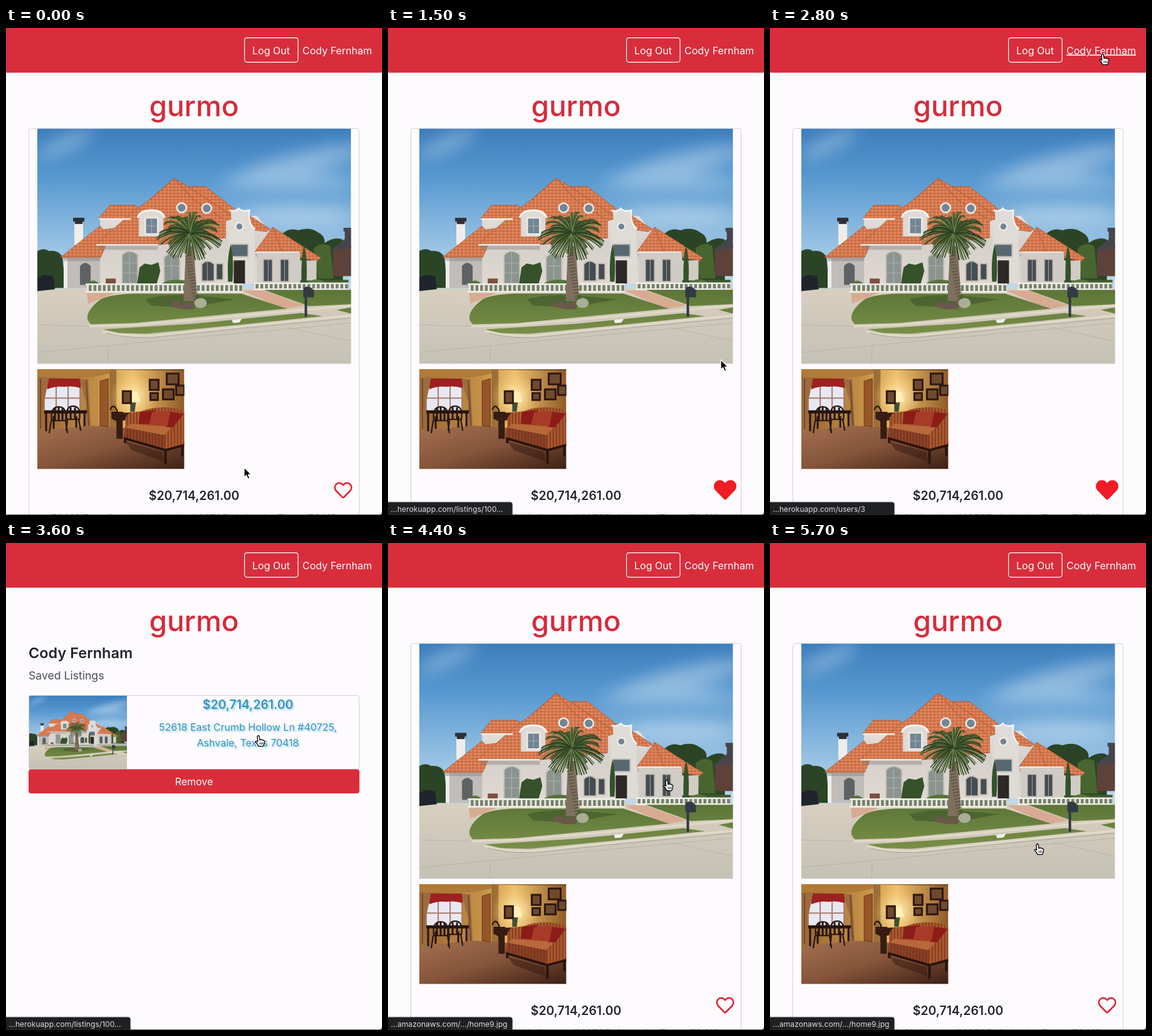
An HTML page that plays this animation: 600 by 778 pixels, repeating every 5800 ms.

```html
<!DOCTYPE html>
<html lang="en">
<head>
<meta charset="utf-8">
<title>Saved listings</title>
<style>
  html, body { margin: 0; height: 100%; overflow: hidden; background: #fdfbfe; }
  svg { display: block; }
  #stage { width: 100vw; height: 100vh; }
  text { font: 16px Inter, sans-serif; }
  .mid { text-anchor: middle; }
  .brand { font-size: 46px; font-weight: 500; fill: #d62b3a; }
  .price { font-size: 19.4px; font-weight: 600; fill: #212529; }
  .link { fill: #212529; }
  .hover .link { fill: #3593bd; filter: drop-shadow(2px 2px 1px #9fd3ea); }
  #status { filter: drop-shadow(0 0 1.5px #0005); }
  #status text { font-size: 12.1px; fill: #dcdcde; }
</style>
</head>
<body>
<svg id="stage" viewBox="0 0 600 778">
  <defs>
    <linearGradient id="sky" x2="0" y2="1">
      <stop stop-color="#3d7ebd"/><stop offset=".3" stop-color="#5798d0"/><stop offset=".6" stop-color="#86b7de"/><stop offset="1" stop-color="#c3dcef"/>
    </linearGradient>
    <linearGradient id="road" x2="0" y2="1">
      <stop stop-color="#d8cfbf"/><stop offset="1" stop-color="#c4c1b5"/>
    </linearGradient>
    <linearGradient id="lawn" x2="0" y2="1">
      <stop stop-color="#5c7637"/><stop offset="1" stop-color="#798f48"/>
    </linearGradient>
    <linearGradient id="stucco" x2="0" y2="1">
      <stop stop-color="#e4dfda"/><stop offset=".4" stop-color="#d5d0cc"/><stop offset="1" stop-color="#dfd9d1"/>
    </linearGradient>
    <linearGradient id="wall">
      <stop stop-color="#98642f"/><stop offset=".45" stop-color="#c89449"/><stop offset=".65" stop-color="#efc16d"/><stop offset="1" stop-color="#8f5a28"/>
    </linearGradient>
    <linearGradient id="floor" y2="1">
      <stop stop-color="#a4704f"/><stop offset=".5" stop-color="#85543a"/><stop offset="1" stop-color="#3c2015"/>
    </linearGradient>
    <radialGradient id="glow">
      <stop stop-color="#fff3c0"/><stop offset="1" stop-color="#f8cf7c" stop-opacity="0"/>
    </radialGradient>
    <pattern id="tiles" width="6" height="5" patternUnits="userSpaceOnUse">
      <path fill="#d97a50" d="M0 0H6V5H0Z"/>
      <path d="M0 4.3H6" stroke="#bb6038" stroke-width="1.2"/>
      <path d="M1 0V4" stroke="#e79b75" stroke-width="1.2"/>
    </pattern>
    <pattern id="weave" width="5" height="4" patternUnits="userSpaceOnUse">
      <path fill="#924322" d="M0 0H5V4H0Z"/><path d="M1 0V4" stroke="#bd733d" stroke-width="1.2"/>
    </pattern>
    <filter id="soft" x="-50%" y="-150%" width="200%" height="400%"><feGaussianBlur stdDeviation="13"/></filter>
    <path id="heart" d="M14.5-13.6C10.6-16.8 4.9-16.3 1.4-12.6L0-11.2-1.4-12.6C-4.9-16.3-10.6-16.8-14.5-13.6-18.9-9.8-19.1-3.1-15.2 1L-1.6 14.9C-.8 15.8.7 15.8 1.6 14.9L15.2 1C19.1-3.1 18.9-9.8 14.5-13.6Z"/>

    <symbol id="house" viewBox="50 161 500 375">
      <path fill="url(#sky)" d="M50 161H550V420H50Z"/>
      <g fill="#e4f0f9" opacity=".42" filter="url(#soft)">
        <ellipse cx="465" cy="218" rx="105" ry="18" transform="rotate(-14 465 218)"/>
        <ellipse cx="450" cy="245" rx="110" ry="12"/>
        <ellipse cx="95" cy="185" rx="50" ry="10" transform="rotate(-25 95 185)"/>
        <ellipse cx="465" cy="300" rx="90" ry="16"/>
      </g>
      <g fill="#2b4425">
        <path d="M50 356Q60 350 69 356 84 354 90 366L95 415H50Z"/>
        <path d="M441 328Q452 318 466 323 484 317 497 326 509 332 508 343 525 332 537 338V410H441Z"/>
      </g>
      <path fill="#48652f" d="M490 352Q503 340 517 348L522 400H497Z"/>
      <path fill="#5d4239" d="M521 355L550 348V396H521Z"/>
      <path fill="#46454b" d="M517 356L540 337V325H538V319H550V351Z"/>
      <path fill="url(#road)" d="M50 416H550V536H50Z"/>
      <path fill="#20242d" d="M50 399L60 394 75 396 78 417 50 420Z"/>
      <path fill="#3f5a2c" d="M480 402H546V418H480Z"/>

      <path fill="url(#stucco)" d="M92 362H150V304H200L262 300H400L421 325V408H92Z"/>
      <path fill="#bfbcba" d="M92 364H150V415H92Z"/>
      <path fill="#5f6263" d="M118 380Q126 370 135 380V410H118Z"/>
      <path fill="#efedea" d="M92 368H98V415H92ZM109 312H123V346H109Z"/>
      <path fill="#302f32" d="M107 303H125V309H122V313H110V309H107Z"/>
      <g fill="url(#tiles)" stroke="#ad5a38" stroke-width=".8">
        <path d="M148 304L165 283H206L216 290 196 304Z"/>
        <path d="M87 366L150 316 155 322 188 318 160 345 151 366Z"/>
        <path d="M144 345L205 291 228 275 268 240 290 253H318L363 288V304L350 308V335L242 346Z"/>
        <path d="M384 297L421 321 415 325 390 322Z"/>
        <path d="M397 357L425 318 502 367 496 372 470 367 468 357Z"/>
      </g>
      <path d="M228 275L268 240 300 275 345 304M290 253L363 302M425 318L440 357" fill="none" stroke="#b85f3a" stroke-width="1.2"/>
      <path fill="#7f7a76" opacity=".4" d="M148 347H242V354H148ZM398 359H469V365H398ZM92 366H150V372H92Z"/>
      <path d="M144 346H242M148 305H199M398 358H468" stroke="#f0ece7" stroke-width="2.5"/>
      <path fill="#dedad5" d="M212 333V302Q213 291 232 291 250 291 251 302V333Z"/>
      <path d="M210 303Q213 291 232 291 249 291 253 303" fill="none" stroke="#f7f5f1" stroke-width="3"/>
      <path fill="#dfdbd6" d="M355 408V320Q361 318 358 291 367 294 371 288 376 294 387 291 384 312 396 320V408Z"/>
      <path d="M356 291Q367 294 371 288 376 294 388 291 385 312 397 321" fill="none" stroke="#f7f5f0" stroke-width="2.5"/>
      <path fill="#d0ccc5" d="M400 359H469V408H400ZM469 371H495V403H469Z"/>
      <g fill="#718594" stroke="#eeebe6" stroke-width="2.5">
        <circle cx="280" cy="287" r="7.5"/><circle cx="320" cy="288" r="7.5"/><circle cx="372" cy="317" r="6"/>
        <path d="M222 329V303H242V329Z"/>
      </g>
      <g fill="#8b948f" stroke="#c6c1b7" stroke-width="2">
        <path d="M185 408V362Q197 351 210 362V408ZM252 408V366Q264 354 277 366V408Z"/>
        <path fill="#464d51" d="M312 404V377Q321 367 332 377V404ZM335 402V376H346V402ZM410 405V369H425V405ZM437 405V369H451V405Z"/>
        <path fill="#586871" d="M358 365V345H386V365Z"/>
      </g>
      <path d="M197 358V408M185 375H210M185 391H210M264 363V408M252 380H277M232 303V329M222 316H242M418 369V405M444 369V405M321 373V404" stroke="#b9bebb" stroke-width=".8"/>
      <path fill="#2e2926" d="M363 371H381V408H363Z"/>
      <path fill="#7b5040" d="M159 400H175V411H159Z"/>
      <g fill="#35522b">
        <path d="M209 408L213 382 221 376 232 378 243 374 246 388 240 409ZM354 405Q352 367 358 346 364 368 361 405ZM471 406Q470 368 475 347 481 368 479 406Z"/>
        <path fill="#57743a" d="M129 410Q137 397 150 409ZM480 407Q496 395 511 407ZM246 410Q264 394 309 409Z"/>
      </g>
      <path d="M129 415H378M395 412H546" stroke="#76806a" stroke-width="10"/>
      <path d="M129 415H378M395 412H546" stroke="#eae8e3" stroke-width="10" stroke-dasharray="3 4.5"/>
      <path d="M127 409H378M127 421H378M395 407.5H546M395 417H546" stroke="#f1efea" stroke-width="2.5"/>
      <path fill="#d7ab92" d="M129 423H174L131 440ZM377 419H411L476 443 443 449Z"/>
      <path fill="url(#lawn)" d="M130 466Q127 451 151 433 166 425 205 424H375L448 448 310 461 205 471 135 473ZM411 418H550V441L483 444ZM155 481L300 472 470 455 505 460 380 473 225 488 180 487ZM527 450L550 446V456Z"/>
      <path fill="#3f562b" opacity=".6" d="M222 433Q255 424 299 427L365 433 338 438 292 447 231 443Z"/>
      <path d="M133 476L205 474 310 465 483 449 550 443M154 484Q190 493 235 491L380 476 508 463 550 459" fill="none" stroke="#e2d8c7" stroke-width="3.5"/>
      <path d="M160 487Q195 496 235 494L380 479 550 463" fill="none" stroke="#a9a598"/>
      <path d="M50 518L235 500 550 471M163 508L162 536M450 478L550 500M50 474L133 476" fill="none" stroke="#b3b0a5" stroke-width=".8"/>
      <path fill="#f3f2eb" d="M360 466L376 464 372 470 362 471Z"/>
      <path fill="#6c584b" d="M264 439Q272 432 280 440L300 437 300 449H282L264 445Z"/>
      <ellipse cx="310" cy="439" rx="10" ry="8" fill="#aaae96"/>
      <path fill="#7f705e" d="M287 348H299L304 420 300 436H283Z"/>
      <path d="M288 353L303 433" stroke="#463f34" stroke-width="10" stroke-dasharray="2 3" opacity=".5"/>
      <g id="palm" fill="none" stroke-width="1.8" stroke-linecap="round"></g>
      <path d="M478 425V461" stroke="#313840" stroke-width="4"/>
      <path fill="#343a43" d="M474 415Q483 409 491 419V430H474Z"/>
    </symbol>

    <symbol id="room" viewBox="50 545 234 159">
      <path fill="url(#wall)" d="M50 545H284V704H50Z"/>
      <path fill="#b07a38" d="M50 545H165V552L136 558H50Z"/>
      <path fill="#6e451f" opacity=".55" d="M165 545H284V548L176 546V638H165Z"/>
      <path fill="url(#floor)" d="M50 643L136 635 187 638 284 660V704H50Z"/>
      <circle cx="203" cy="588" r="38" fill="url(#glow)"/>
      <path fill="#e8e8f2" d="M61 566H118V613H61Z"/>
      <path d="M61 566H118V613H61ZM80 566V613M99 566V613M61 591H118" fill="none" stroke="#a87d69" stroke-width="2"/>
      <path fill="#9c211f" d="M64 560H119V575Q106 571 93 573 79 571 66 577Z"/>
      <path fill="#9c6c3e" d="M50 558H69L62 591 56 600 63 640 50 644ZM117 561H131L135 637H124L128 600Z"/>
      <path d="M55 560V640M128 563L132 635" stroke="#75492a" stroke-width="2"/>
      <path fill="#965628" stroke="#60371b" d="M150 564L163 560V637L150 635Z"/>
      <g stroke="#251511" fill="none" stroke-width="3">
        <path d="M61 613H129" stroke-width="5"/><path d="M64 612V644M125 612V636M76 620V640M112 620V638"/>
        <path d="M73 627Q70 605 84 605 98 605 95 627ZM72 627L69 647M95 627L98 647M97 625Q94 604 107 604 120 604 117 625ZM98 625L96 643M116 625L119 643M166 610Q171 598 177 611V637M168 614H187M183 615V656" stroke-width="2.2"/>
        <path d="M78 607V627M84 605V627M90 607V627M103 606V625M110 606V625"/>
      </g>
      <path fill="#371c12" d="M168 615L199 614V625L186 627V656H176V628L168 624Z"/>
      <path fill="#fff0b7" d="M196 581H209L214 597H191Z"/>
      <path fill="#405034" d="M198 598H207L205 613H198Z"/>
      <g fill="#704a2d" stroke="#2d1811" stroke-width="3">
        <path d="M186 580H199V599H186ZM229 562H243V578H229ZM256 552H275V569H256ZM230 583H242V594H230ZM250 577H267V593H250ZM271 571H284V586H271Z"/>
      </g>
      <path fill="url(#weave)" d="M190 634Q188 619 198 614L216 612Q240 602 276 608L284 614V666L254 674 188 656Z"/>
      <path fill="#64291b" d="M190 635L253 650V672L188 656Z" opacity=".45"/>
      <path fill="#b8683a" d="M199 632L249 636 274 627 252 650 190 638Z"/>
      <path fill="#8b1c18" d="M214 613L238 610 236 633 211 632ZM262 613L283 616 266 638 254 637Z"/>
      <path fill="#a83a28" d="M233 613L262 612 257 636 228 633Z"/>
      <path d="M188 655L254 674 284 666M190 656V663M254 674V696M281 667V684" fill="none" stroke="#2b140e" stroke-width="4"/>
      <path fill="#32190f" opacity=".5" d="M190 660L249 677 251 692 200 674Z"/>
    </symbol>
  </defs>

  <rect width="600" height="778" fill="#fdfbfe"/>
  <rect width="600" height="71.4" fill="#d92d3c"/>
  <rect x="380.6" y="15.6" width="85.5" height="39" rx="4" fill="none" stroke="#fff" stroke-width="1.2"/>
  <text x="423" y="41.5" class="mid" fill="#fff">Log Out</text>
  <text id="user" x="584" y="41.5" text-anchor="end" fill="#fff">Cody Fernham</text>
  <text x="300" y="141" class="mid brand">gurmo</text>

  <g id="listing">
    <rect x="36.5" y="160.5" width="527" height="640" rx="4" fill="#fdfbfe" stroke="#d3d1d5"/>
    <use href="#house" x="50" y="161" width="500.6" height="375.5"/>
    <use href="#room" x="50" y="545" width="234.5" height="159.5"/>
    <text x="300" y="753.5" class="mid price">$20,714,261.00</text>
    <text x="300" y="789.3" class="mid" style="font-weight:500">52618 East Crumb Hollow Ln #40725, Ashvale, Texas 70418</text>
    <use id="empty" href="#heart" transform="translate(538 738.5) scale(.74)" fill="none" stroke="#df2535" stroke-width="3.5"/>
    <use id="full" href="#heart" transform="translate(538 738)" fill="#f01c25"/>
  </g>

  <g id="profile">
    <text x="36" y="183.5" style="font-size:23.5px;font-weight:600" fill="#212529">Cody Fernham</text>
    <text x="36" y="218" style="font-size:17.6px" fill="#4c4b4f">Saved Listings</text>
    <rect x="36.5" y="243.5" width="527" height="118" rx="4" fill="#fdfbfe" stroke="#d3d1d5"/>
    <use href="#house" x="37" y="244" width="156" height="117"/>
    <text x="386" y="264.5" class="mid price link">$20,714,261.00</text>
    <text x="386" y="300" class="mid link">52618 East Crumb Hollow Ln #40725,</text>
    <text x="386" y="325" class="mid link">Ashvale, Texas 70418</text>
    <rect x="36" y="361.5" width="528" height="38.5" rx="4" fill="#d92d3c"/>
    <text x="300" y="386.5" class="mid" fill="#fff">Remove</text>
  </g>

  <g id="status">
    <path d="M0 757.4H194.5Q198.5 757.4 198.5 761.4V778H0Z" fill="#1f2022"/>
    <text id="url" x="4.5" y="773"></text>
  </g>
  <path d="M0 777.3H600V778H0ZM600 772V778H594Q600 778 600 772ZM0 774V778H4Q0 778 0 774Z" fill="#2a2a2c"/>

  <g id="cursor" stroke-linejoin="round">
    <path id="arrow" d="M0 0V15.6L3.6 12.4 6.2 18.2 8.8 17 6.4 11.3H11.2Z" fill="#000" stroke="#fff" stroke-width="1.2"/>
    <g id="hand">
      <path d="M-2 1.6C-2-.9 1-.9 1.3 1.6L2 7Q3.4 4.8 5 6.6 6.8 5.5 7.5 7.6 9.5 7 9.6 9.2L9 13 7.7 16.6H0L-2 13-5 9.6Q-4.2 7.2-1.4 9.6Z" fill="#fff" stroke="#000" stroke-width="1.3"/>
      <path d="M2.2 10.5V14M4.5 10.5V14M6.7 10.5V14" stroke="#000" stroke-width=".9"/>
    </g>
  </g>
</svg>
<script>
const $ = id => document.getElementById(id);
const show = (id, on) => $(id).style.display = on ? '' : 'none';
const LOOP = 5800, STEP = 100;

// Palm crown: drooping fronds spread around the trunk top
const greens = ['#26391f', '#40592b', '#708250', '#344c27'];
for (let i = 0; i < 84; i++) {
  const a = i * 2.4, r = .6 + .4 * Math.abs(Math.sin(i * 7.3));
  const x = 53 * r * Math.cos(a), y = 39 * r * Math.sin(a);
  const frond = document.createElementNS('http://www.w3.org/2000/svg', 'path');
  frond.setAttribute('d', `M293 328q${x * .6} ${y * .8 - 9} ${x} ${y + 5}`);
  frond.setAttribute('stroke', greens[i % 4]);
  $('palm').append(frond);
}

// Pointer stops: time, x, y
const stops = [
  [0, 380, 702], [100, 380, 702], [700, 537, 737], [1200, 537, 737], [1500, 531, 530],
  [1900, 529, 150], [2200, 527, 67], [2500, 531, 42], [2900, 531, 42], [3400, 403, 308],
  [3900, 403, 308], [4400, 445, 379], [5000, 427, 481], [LOOP, 427, 481]
];
const hands = [[600, 1400], [1600, 2000], [2400, 3000], [3300, LOOP]];
const saved = '...herokuapp.com/listings/100...';
const photo = '...amazonaws.com/.../home9.jpg';
const urls = [[0, ''], [700, saved], [1600, photo], [2400, '...herokuapp.com/users/3'], [3300, saved], [4000, photo]];
const within = (t, from, to) => t >= from && t < to;

function pointer(t) {
  const i = stops.findIndex(s => s[0] > t);
  const [t0, x0, y0] = stops[i - 1], [t1, x1, y1] = stops[i];
  const u = (t - t0) / (t1 - t0), k = u * u * (3 - 2 * u);
  return [x0 + (x1 - x0) * k, y0 + (y1 - y0) * k];
}

function draw(t) {
  const profile = within(t, 3000, 3900), liked = within(t, 1000, 3000);
  const hand = hands.some(([from, to]) => within(t, from, to));
  const url = urls.findLast(u => u[0] <= t)[1];
  show('profile', profile);
  show('listing', !profile);
  show('full', liked);
  show('empty', !liked);
  show('hand', hand);
  show('arrow', !hand);
  show('status', url);
  $('url').textContent = url;
  $('profile').classList.toggle('hover', t >= 3300);
  $('user').style.textDecoration = within(t, 2400, 3100) ? 'underline' : 'none';
  $('cursor').setAttribute('transform', `translate(${pointer(t)})`);
}

const start = performance.now();
function tick() {
  const t = (performance.now() - start) % LOOP;
  draw(Math.floor(t / STEP) * STEP);
  requestAnimationFrame(tick);
}
tick();
</script>
</body>
</html>
```
